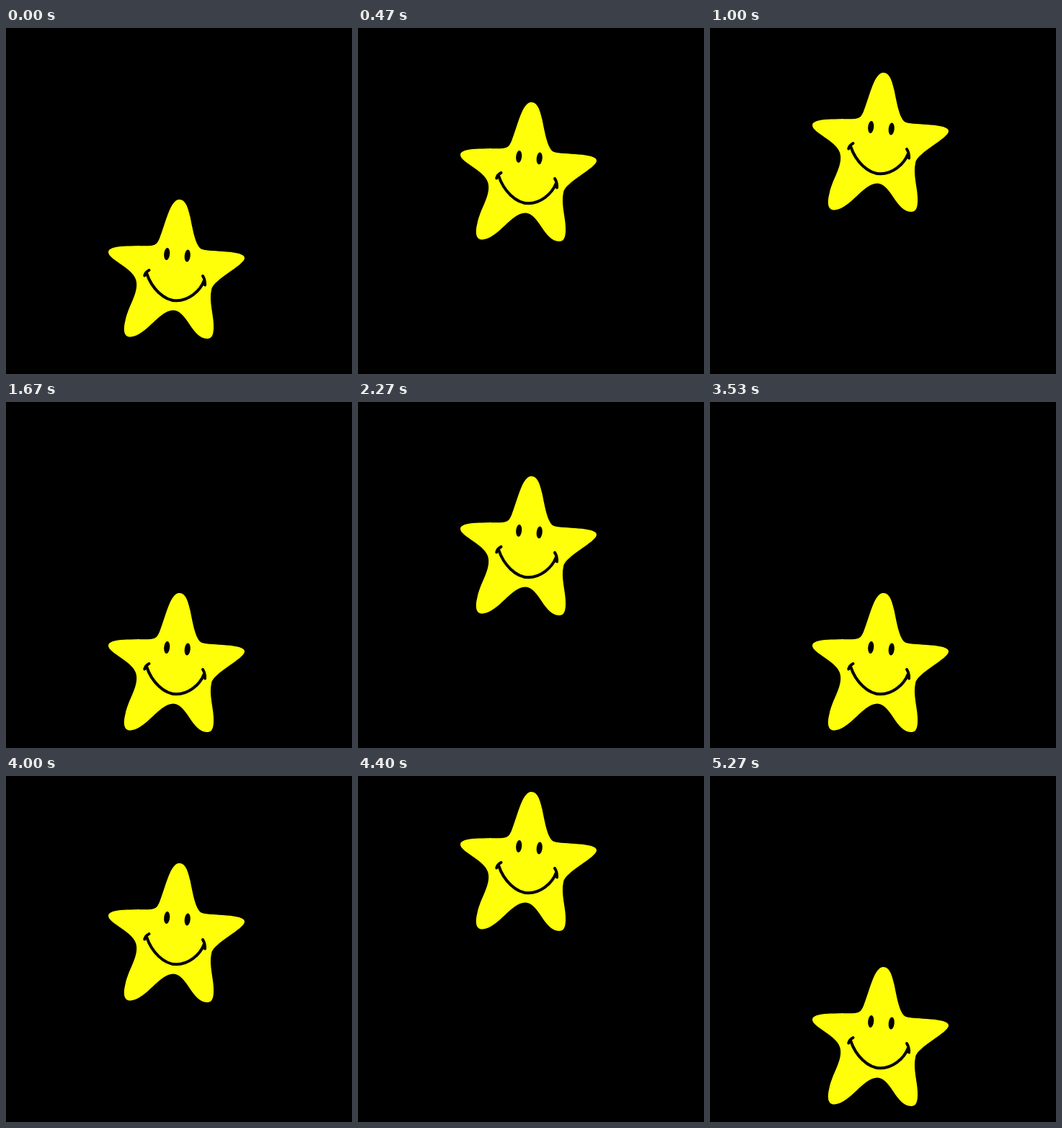
Write an HTML page with a canvas that moves like this. It is 480 px wide and 480 px high and loops after 5340 ms.

```html
<!DOCTYPE html>
<html lang="en">
<head>
<meta charset="utf-8">
<title>Bouncing star</title>
<style>
  html, body { margin: 0; width: 100%; height: 100%; overflow: hidden; background: #000; }
  canvas { display: block; width: 480px; height: 480px; }
</style>
</head>
<body>
<canvas id="stage" width="480" height="480"></canvas>
<script>
const ctx = document.getElementById('stage').getContext('2d');
const LOOP = 5340;
const BOUNCE = 27; // steps per bounce, 15 steps per second
const REST_Y = 238;

const body = new Path2D(
  'M240.5 238 C249.5 238 252.5 250 255.5 262 C259 279 263 304 272 307 ' +
  'C284 311 331 308 331 319 C331 329 287 349 285 363 ' +
  'C281 380 289 400 288 417 C287.5 427 285 431 279 431 ' +
  'C258 431 251 391.5 232 391.5 C213 391.5 194 427 173 428.5 ' +
  'C163 429 162.5 418 165.5 406 C170 385 183 369 181 353 ' +
  'C180 334 142 322 142 311 C142 300 180 303 201 302 ' +
  'C208 301 210.5 299 214 289 C222 269 228 238 240.5 238 Z');
const smile = new Path2D('M195 340 C202 361 219 378.3 236.5 378.3 C252.5 378.3 269 366 275 350');
const dimples = new Path2D('M192.2 343.5 Q193.5 338.5 198.5 336 M273 344 Q276.5 349.5 276 356.5');

// Height of the star's tip over one bounce: [step, y]
const keys = [[0, 238], [4.5, 149], [9, 68], [12, 22], [13, 26],
              [15, 62], [18, 106.5], [21.5, 179], [25, 265], [26, 265]];

function slope(i) {
  const a = keys[Math.max(i - 1, 0)], b = keys[Math.min(i + 1, keys.length - 1)];
  return (b[1] - a[1]) / (b[0] - a[0]);
}

function tipY(step) {
  let i = 0;
  while (i < keys.length - 2 && step >= keys[i + 1][0]) i++;
  const [x0, y0] = keys[i], [x1, y1] = keys[i + 1];
  const d = x1 - x0, u = (step - x0) / d, v = 1 - u;
  return v * v * (1 + 2 * u) * y0 + u * u * (3 - 2 * u) * y1
       + d * u * v * (v * slope(i) - u * slope(i + 1));
}

function eye(x, y) {
  ctx.beginPath();
  ctx.ellipse(x, y, 4, 8.5, 0.1, 0, Math.PI * 2);
  ctx.fill();
}

function drawStar(y) {
  ctx.save();
  ctx.translate(0, y - REST_Y);
  ctx.fillStyle = '#ffff0a';
  ctx.fill(body);
  ctx.fillStyle = ctx.strokeStyle = '#000';
  ctx.lineCap = ctx.lineJoin = 'round';
  eye(223.2, 313.5);
  eye(251.7, 316);
  ctx.lineWidth = 4;
  ctx.stroke(smile);
  ctx.stroke(dimples);
  ctx.restore();
}

function render(now) {
  const tick = Math.floor((now % LOOP) / 10);
  const step = Math.min(79, Math.floor((tick + 0.5) * 3 / 20));
  ctx.fillStyle = '#000';
  ctx.fillRect(0, 0, 480, 480);
  drawStar(tipY(step % BOUNCE));
}

const start = performance.now();
function loop() {
  render(performance.now() - start);
  requestAnimationFrame(loop);
}
loop();
</script>
</body>
</html>
```
